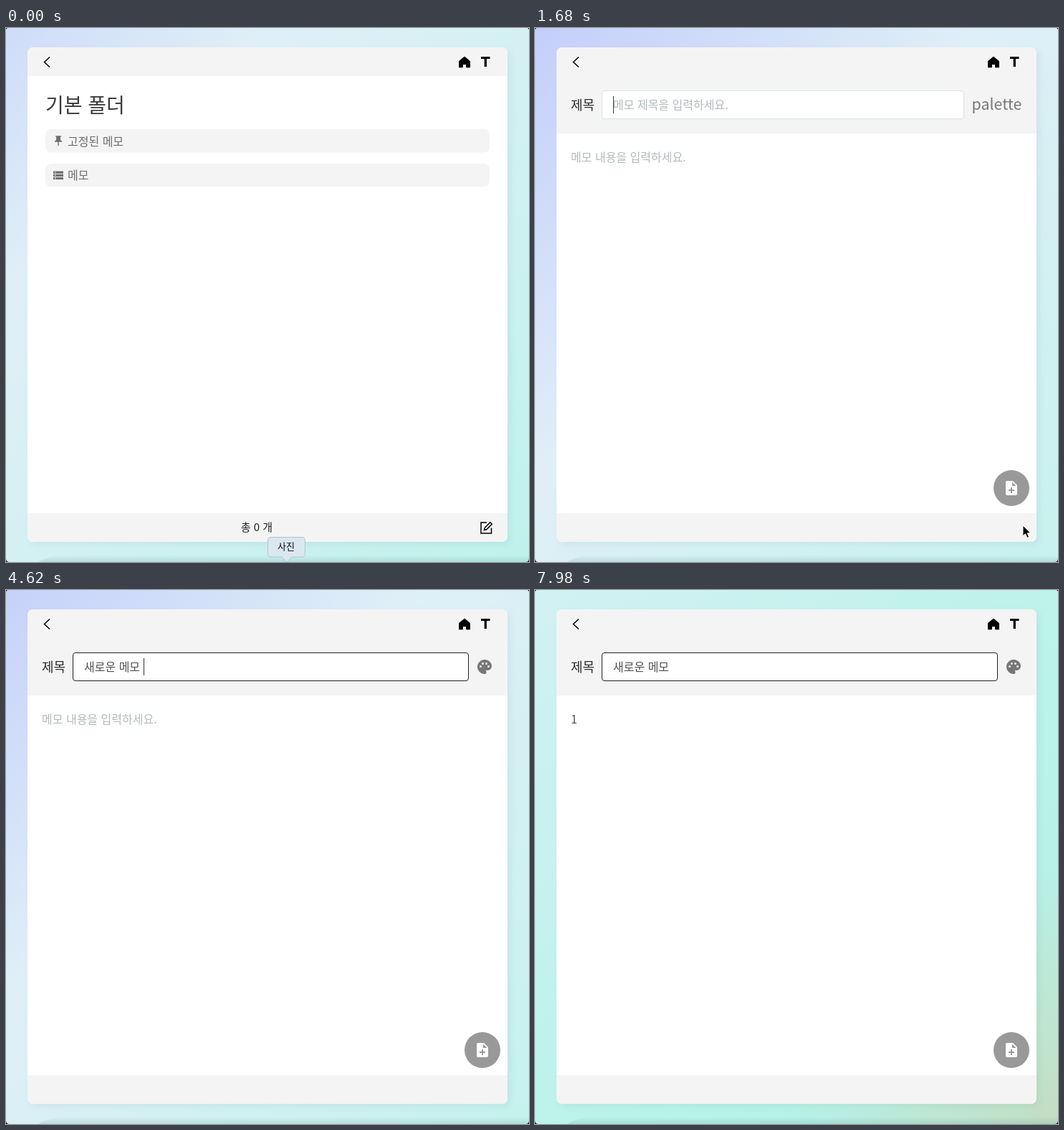
An HTML page for the animation above (8000 ms loop, 730x744 px).

```html
<!DOCTYPE html>
<html lang="ko">
<head>
<meta charset="utf-8">
<title>메모</title>
<style>
html, body { margin: 0; width: 100%; height: 100%; overflow: hidden; background: #24153c; }
svg { display: block; width: 100vw; height: 100vh; }
text { font: 400 16px "Noto Sans CJK KR", "Noto Sans CJK JP", "Noto Sans CJK", sans-serif; white-space: pre; }
.card { filter: drop-shadow(4px 4px 4px rgba(0, 60, 70, .06)); }
.hint { fill: #b4b9bc; }
.label { fill: #6d6d6d; }
.value { fill: #505050; }
</style>
</head>
<body>
<svg viewBox="0 0 730 744">
  <defs>
    <linearGradient id="sky" gradientUnits="userSpaceOnUse" x1="0" y1="0" x2="1474" y2="1474">
      <stop offset="0" stop-color="#bfc8fb"/>
      <stop offset=".25" stop-color="#dfeff7"/>
      <stop offset=".7" stop-color="#b9f3e9"/>
      <stop offset=".775" stop-color="#b7f1e7"/>
      <stop offset=".915" stop-color="#c5dbbe"/>
    </linearGradient>
    <linearGradient id="edge" x2="0" y2="1">
      <stop offset="0" stop-color="#5a9a98" stop-opacity="0"/>
      <stop offset="1" stop-color="#5a9a98" stop-opacity=".22"/>
    </linearGradient>
    <clipPath id="cardClip"><rect x="30" y="27" width="670" height="689" rx="8"/></clipPath>
  </defs>

  <path d="M2 0H728L730 2V739Q730 744 725 744H5Q0 744 0 739V2Z" fill="url(#sky)"/>
  <path d="M45 744Q60 734 90 734H730V739Q730 744 725 744Z" fill="url(#edge)"/>

  <rect class="card" x="30" y="27" width="670" height="689" rx="8" fill="#fff"/>
  <g clip-path="url(#cardClip)" fill="#f4f4f4">
    <rect id="header" x="30" y="27" width="670" height="40"/>
    <rect x="30" y="676" width="670" height="40"/>
  </g>
  <path d="M61 40.5L53.5 47.5L61 54.5" fill="none" stroke="#000" stroke-width="1.5"/>
  <path d="M640 40L632.5 46.3V54.8H637.5V50.5H642.5V54.8H647.5V46.3Z" stroke="#000" stroke-linejoin="round"/>
  <path d="M663 40H675.5V43H670.9V54H667.7V43H663Z"/>

  <g id="list">
    <text x="55" y="117.5" fill="#3a3a3a" style="font-size:28px;font-weight:500">기본 폴더</text>
    <g fill="#f4f4f4">
      <rect x="55" y="141" width="620" height="32.5" rx="8"/>
      <rect x="55" y="189" width="620" height="32" rx="8"/>
    </g>
    <g class="label">
      <path transform="translate(64.4 148.7) scale(.72)" d="M16 9V4h1a1 1 0 0 0 0-2H7a1 1 0 0 0 0 2h1v5c0 1.66-1.34 3-3 3v2h5.97v7l1 1 1-1v-7H19v-2c-1.66 0-3-1.34-3-3z"/>
      <text x="86" y="163.6">고정된 메모</text>
      <path d="M66 199.5h14v3.2H66zM66 203.7h14v3.2H66zM66 207.9h14v3.2H66z"/>
      <path d="M68 200.4h1.4v1.4H68zM68 204.6h1.4v1.4H68zM68 208.8h1.4v1.4H68z" fill="#f4f4f4"/>
      <text x="86" y="211.4">메모</text>
    </g>
    <text x="350" y="701" text-anchor="middle" fill="#222" style="font-size:15px">총 0 개</text>
    <path d="M671 689H663V704H677.5V696.5M667.5 699.5L668.3 696.3L675.8 688.8L678.3 691.2L670.7 698.7Z" fill="none" stroke="#000" stroke-width="1.5"/>
  </g>

  <g id="editor">
    <text x="50" y="114" fill="#2b2b2b" style="font-size:18px;font-weight:500">제목</text>
    <rect id="field" x="93.5" y="87.5" height="39" rx="3.5" fill="#fff"/>
    <text id="titleHint" class="hint" x="109" y="113.4">메모 제목을 입력하세요.</text>
    <text id="title" class="value" x="109" y="113.4"></text>
    <rect id="underline" y="117" height="1.5" fill="#333"/>
    <text id="iconName" x="609.5" y="114" fill="#777" style="font-size:21.4px;font-weight:300">palette</text>
    <g id="iconShape" transform="translate(656 95)" fill="#777">
      <path d="M12 22C6.49 22 2 17.51 2 12S6.49 2 12 2s10 4.04 10 9c0 3.31-2.69 6-6 6h-1.77c-.28 0-.5.22-.5.5 0 .12.05.23.13.33.41.47.64 1.06.64 1.67A2.5 2.5 0 0 1 12 22z"/>
      <path d="M6.5 11.5h0M9.5 7.5h0M14.5 7.5h0M17.5 11.5h0" stroke="#f4f4f4" stroke-width="3" stroke-linecap="round"/>
    </g>
    <text id="bodyHint" class="hint" x="50" y="185.6">메모 내용을 입력하세요.</text>
    <text id="body" class="value" x="50" y="185.6">1</text>
    <rect id="caret" width="1" height="24" fill="#333"/>
    <circle cx="665" cy="641" r="25" fill="#999"/>
    <path transform="translate(653 629)" fill="#fff" fill-rule="evenodd" d="M14 2H6c-1.1 0-2 .9-2 2v16a2 2 0 0 0 2 2h12c1.1 0 2-.9 2-2V8l-6-6zm2 14h-3v3h-2v-3H8v-2h3v-3h2v3h3v2zm-3-7V3.5L18.5 9H13z"/>
  </g>

  <g id="tooltip">
    <path d="M370 709.5H413Q417.5 709.5 417.5 714V732.5Q417.5 737 413 737H399L392 744L385 737H370Q365.5 737 365.5 732.5V714Q365.5 709.5 370 709.5Z" fill="#dbe7ef" stroke="#b5c3cb"/>
    <text x="391" y="727" text-anchor="middle" fill="#111" style="font-size:13px">사진</text>
  </g>

  <path id="arrow" d="M0 0V15L3.5 11.8L6 17.3L8.6 16.2L6.2 10.8H11Z" stroke="#fff"/>
  <g id="beam" fill="none">
    <path id="beamShape" d="M-3.5-8Q0-8 0-5Q0-8 3.5-8M0-5V5M-3.5 8Q0 8 0 5Q0 8 3.5 8M-2 2H2" stroke="#fff" stroke-width="3"/>
    <use href="#beamShape" style="stroke:#000"/>
    <path d="M-3.5-8Q0-8 0-5Q0-8 3.5-8M0-5V5M-3.5 8Q0 8 0 5Q0 8 3.5 8M-2 2H2" stroke="#111" stroke-width="1.3"/>
  </g>
</svg>
<script>
const LOOP = 8000, STEP = 70;
const OPEN = 1680, READY = 1750, BODY_FOCUS = 6300, BODY_TYPED = 6580, TITLE_FOCUS = 7210;
const el = Object.fromEntries([...document.querySelectorAll('[id]')].map(e => [e.id, e]));

// [time, title text, last syllable still being composed]
const typing = [
  [0, '', 0], [3430, 'ㅅ', 1], [3570, '새', 1], [3640, '샐', 1], [3710, '새로', 1],
  [3850, '새롱', 1], [3920, '새로우', 1], [4060, '새로운', 1], [4130, '새로운 ', 0],
  [4200, '새로운 ㅁ', 1], [4270, '새로운 메', 1], [4340, '새로운 멤', 1],
  [4480, '새로운 메모', 1], [4620, '새로운 메모 ', 0], [4760, '새로운 메모', 0],
  [5530, '새로운 메모ㅂ', 1], [BODY_FOCUS, '새로운 메모ㅂ', 0], [7420, '새로운 메모', 0]
];
const blinkStarts = [OPEN, ...typing.slice(1).map(k => k[0]).filter(t => t !== 4760), BODY_TYPED, TITLE_FOCUS];

// [time, x, y]
const pointer = [
  [70, 400, 765], [560, 680, 705], [1330, 680, 705], [1540, 681, 693], [2100, 681, 693],
  [2450, 510, 223], [6720, 510, 223], [6930, 430.5, 91], [7200, 240, 106]
];

const show = (e, on) => e.style.display = on ? '' : 'none';
const within = (t, a, b) => t >= a && t < b;
const set = (e, attrs) => { for (const k in attrs) e.setAttribute(k, attrs[k]); };

function pointerAt(t) {
  if (t <= pointer[0][0]) return pointer[0].slice(1);
  const i = pointer.findIndex(p => p[0] > t);
  if (i < 0) return pointer.at(-1).slice(1);
  const [a, b] = [pointer[i - 1], pointer[i]];
  const u = (t - a[0]) / (b[0] - a[0]), e = u * u * (3 - 2 * u);
  return [1, 2].map(k => a[k] + (b[k] - a[k]) * e);
}

function drawSky(t) {
  const s = t / 1000 - 3.2;
  const shift = (s < 0 ? .039 : .066) * Math.abs(s) ** 1.6 * -737;
  set(el.sky, { gradientTransform: `translate(${shift} ${shift})` });
}

function drawEditor(t) {
  const [, text, composing] = typing.findLast(k => k[0] <= t);
  const inBody = within(t, BODY_FOCUS, TITLE_FOCUS);
  const ready = t >= READY;
  el.title.textContent = text;
  show(el.titleHint, !text);
  show(el.iconName, !ready);
  show(el.iconShape, ready);
  set(el.field, {
    width: ready ? 552 : 505,
    stroke: !ready ? '#d9e3e4' : inBody ? '#e0e0e0' : '#222'
  });

  const typed = t >= BODY_TYPED;
  show(el.bodyHint, !typed);
  show(el.body, typed);

  const end = 109 + (text ? el.title.getComputedTextLength() : 0);
  show(el.underline, composing);
  set(el.underline, { x: end - 14, width: 15 });

  const since = t - blinkStarts.filter(b => b <= t).at(-1);
  show(el.caret, since % 1060 < 530);
  set(el.caret, inBody
    ? { x: typed ? 58 : 50, y: 167 }
    : { x: text ? Math.round(end + .3) : 109, y: 95 });
}

function drawPointer(t) {
  const [x, y] = pointerAt(t);
  const visible = within(t, 70, 3430) || within(t, 5880, 6440) || within(t, 6790, 7420);
  const isBeam = t >= 2100 && y < 676;
  for (const [e, on] of [[el.arrow, !isBeam], [el.beam, isBeam]]) {
    show(e, visible && on);
    set(e, { transform: `translate(${x} ${y})` });
  }
}

function draw(now) {
  const t = Math.floor(now % LOOP / STEP) * STEP;
  const editing = t >= OPEN;
  drawSky(t);
  show(el.tooltip, t < 140);
  show(el.list, !editing);
  show(el.editor, editing);
  set(el.header, { height: editing ? 120 : 40 });
  if (editing) drawEditor(t);
  drawPointer(t);
}

const start = performance.now();
function tick() {
  draw(performance.now() - start);
  requestAnimationFrame(tick);
}
tick();
</script>
</body>
</html>
```
